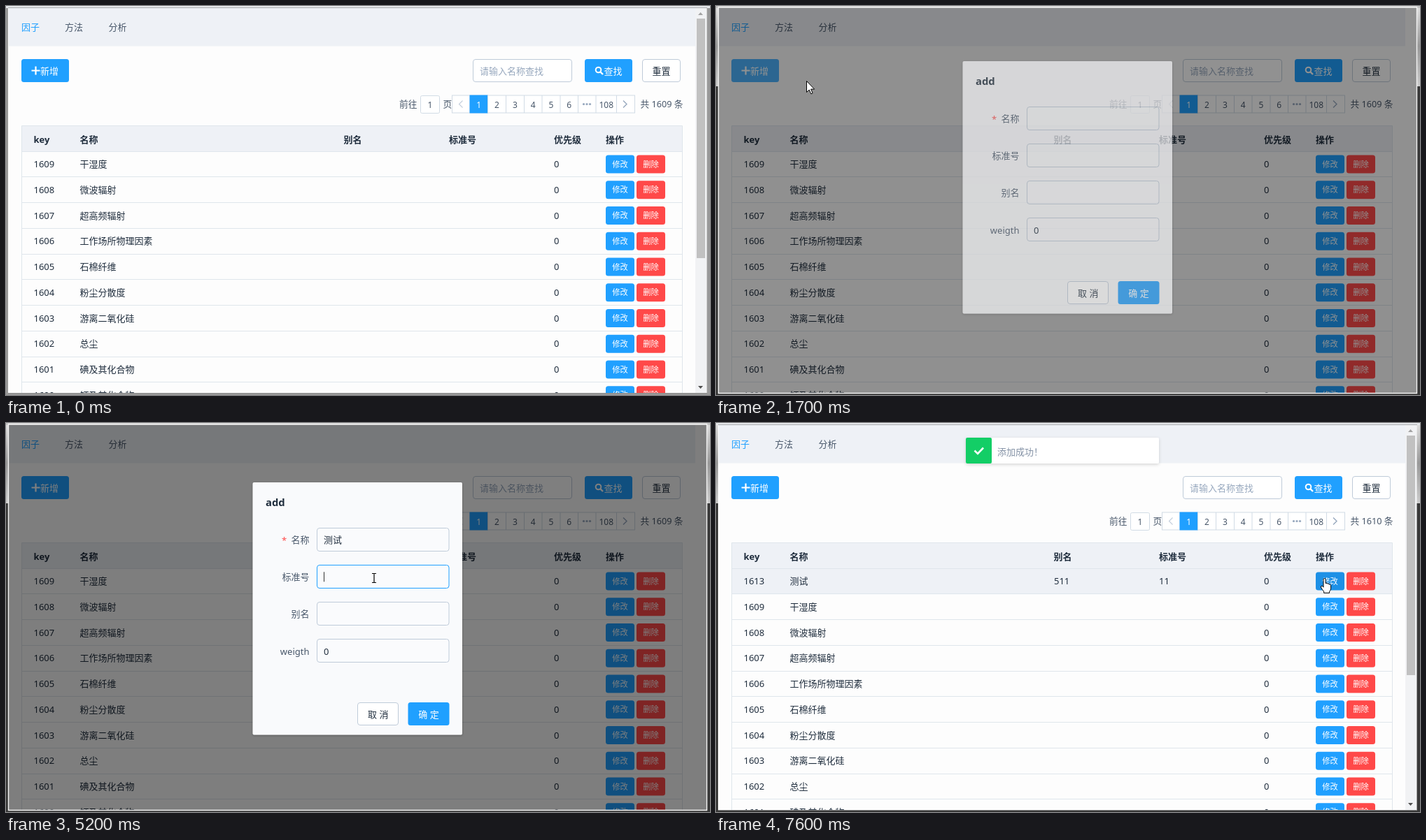
Animation of 1006x557 px, one loop 8000 ms. Source, as an HTML page:

```html
<!DOCTYPE html>
<html lang="zh-CN">
<head>
<meta charset="utf-8">
<style>
  html, body { margin: 0; width: 100%; height: 100%; overflow: hidden; background: #fdfdfd; }
  svg { display: block; font: 13px 'Noto Sans', 'Noto Sans CJK SC', 'Noto Sans CJK', sans-serif; }
</style>
</head>
<body>
<svg id="stage" width="1006" height="557" viewBox="0 0 1006 557"></svg>
<script>
const LOOP = 8000, STEP = 100;
const BLUE = '#20a0ff', HOVER = '#1d90e6', RED = '#ff4949', INK = '#1f2d3d', GREY = '#48576a',
      PALE = '#97a8be', EDGE = '#bfcbd9', LINE = '#dfe6ec', BAND = '#eef1f6', PAGE = '#fdfdfd';
const ROW_TOP = 208.5, ROW_H = 36.75;
const NAMES = ['干湿度', '微波辐射', '超高频辐射', '工作场所物理因素', '石棉纤维', '粉尘分散度',
               '游离二氧化硅', '总尘', '碘及其化合物', '钙及其化合物'];

// time, x, y, pointer shape
const POINTER = [
  [100, 871, 46, 'arrow'], [500, 480, 74, 'arrow'], [800, 160, 92, 'arrow'], [900, 98, 78, 'arrow'],
  [1000, 51, 44, 'arrow'], [1100, 51, 44, 'arrow'], [1200, 117, 90, 'arrow'], [1300, 46, 94, 'hand'],
  [1500, 46, 94, 'hand'], [1600, 66, 96, 'arrow'], [1700, 128.5, 106.5, 'arrow'], [2000, 404, 194, 'arrow'],
  [2300, 481, 167, 'beam'], [4700, 488, 172, 'beam'], [4900, 526, 222, 'beam'], [5300, 526, 222, 'beam'],
  [5400, 505, 275, 'beam'], [5500, 575, 345, 'arrow'], [5600, 616, 412, 'hand'], [5700, 619, 416, 'hand'],
  [6200, 619, 416, 'hand'], [6400, 624.5, 378, 'arrow'], [7200, 858, 226, 'arrow'],
  [7300, 863, 220, 'hand'], [7600, 869, 222, 'hand']];
const MASK = [[1500, 0], [1600, .2], [1700, .43], [1800, .5], [6300, .5], [6400, .036], [6500, 0]];
const DIALOG = [[1500, 0], [1600, .25], [1700, .67], [1800, .94], [1900, 1], [6300, 1], [6400, .2], [6500, .04], [6600, 0]];
const SLIDE = [[1500, -18.4], [1600, -13], [1700, -6], [1800, -1], [1900, 0], [6300, 0], [6400, -14], [6500, -18]];
const TOAST = [[6300, 0, -37], [6400, .68, -18], [6500, .95, -3], [6600, 1, 0]];

const SHAPES = {
  arrow: '<path d="M.5 .5v16l3.7-3.5 2.6 5.8 2.3-1-2.5-5.7h5z" fill="#fff" stroke="#000"/>',
  hand: '<path d="M.5 .5q1.6 0 1.6 1.6v5.4q2.6-.9 2.9 .8 2.2-.8 2.5 .9 2.1-.5 2.1 1.4v4q0 3-2 4.6v2.1h-8v-2.1q-2.4-2.4-4.2-6.2 0-2 1.8-1.7l1.8 1.9v-11.1q0-1.6 1.5-1.6z" fill="#fff" stroke="#000"/>',
  beam: '<path d="M-3-6.5h2.5l.5 .5 .5-.5h2.5M0-6v12M-3 6.5h2.5l.5-.5 .5 .5h2.5" fill="none" stroke="#000" stroke-width="1.2"/>'
};

// Value list at time t, linear between keys; words are kept from the earlier key
function at(keys, t) {
  let i = 0;
  while (i < keys.length - 1 && keys[i + 1][0] <= t) i++;
  const a = keys[i], b = keys[i + 1] || a;
  const k = b === a ? 0 : Math.max(0, (t - a[0]) / (b[0] - a[0]));
  return a.slice(1).map((v, j) => typeof v === 'number' ? v + (b[j + 1] - v) * k : v);
}

const rect = (x, y, w, h, fill, extra = '') =>
  `<rect x="${x}" y="${y}" width="${w}" height="${h}" fill="${fill}" ${extra}/>`;
const text = (x, y, s, fill = INK, extra = '') => `<text x="${x}" y="${y}" fill="${fill}" ${extra}>${s}</text>`;
const mid = 'text-anchor="middle"', end = 'text-anchor="end"';
const path = (d, stroke, w = 1, extra = '') => `<path d="${d}" fill="none" stroke="${stroke}" stroke-width="${w}" ${extra}/>`;
const box = (x, y, w, h, stroke = EDGE, fill = 'none') => rect(x, y, w, h, fill, `rx="3.5" stroke="${stroke}"`);
const pill = (x, y, w, h, fill) => rect(x, y, w, h, fill, 'rx="3.5"');
const group = (x, y, opacity, body) => `<g transform="translate(${x} ${y})" opacity="${opacity}">${body}</g>`;

function frame(t, modal) {
  if (t < 1500) return rect(0, 0, 1006, 557, '#999') + rect(0, 0, 1006, 3, '#e6e8eb');
  return rect(0, 0, 1006, 557, '#383838') + rect(0, 0, 1006, 115, 'url(#glass)') +
    rect(0, 0, 1006, 3, modal ? '#c4c4c4' : '#e6e8eb');
}

function toolbar(t) {
  const add = t < 1300 ? BLUE : t < 1600 ? HOVER : t < 2400 ? '#4db3ff' : BLUE;
  return rect(4, 3, 981, 54.5, BAND) +
    text(22, 35, '因子', BLUE) + text(84, 35, '方法', GREY) + text(146.5, 35, '分析', GREY) +
    pill(22, 76, 68, 33, add) + path('M36.5 92.5h12M42.5 86.5v12', '#fff', 2.2) + text(49, 97.5, '新增', '#fff') +
    box(667.5, 76.5, 141, 32, EDGE, '#fff') + text(677, 97.5, '请输入名称查找', PALE) +
    pill(827, 76, 68, 33, BLUE) + '<circle cx="846.5" cy="91.5" r="3.8" fill="none" stroke="#fff" stroke-width="2"/>' +
    path('M849.5 94.5l3.5 3.5', '#fff', 2.4) + text(854.5, 97.5, '查找', '#fff') +
    box(909.5, 76.5, 54, 32, EDGE, '#fff') + text(936.5, 97.5, '重置', INK, mid);
}

function pager(total) {
  const edges = [637.5, 663, 688.5, 714.5, 740.5, 766, 792, 817.5, 843, 872.5, 898.5];
  const labels = ['', '1', '2', '3', '4', '5', '6', '', '108', ''];
  const small = 'font-size="12.7"';
  let s = text(562, 145, '前往', GREY, small) + rect(592.5, 128.5, 27, 25, '#fff', `rx="2" stroke="#d1dbe5"`) +
    text(606, 145.5, '1', GREY, 'font-size="12" ' + mid) + text(624.5, 145, '页', GREY, small) +
    rect(637.5, 128, 261, 25, '#fff', 'stroke="#d1dbe5"');
  labels.forEach((label, i) => {
    const x = edges[i], c = (x + edges[i + 1]) / 2;
    if (i) s += path(`M${x} 128v25`, '#d1dbe5');
    if (i === 1) s += rect(x - .5, 127.5, 26, 26, BLUE);
    s += text(c, 145.5, label, i === 1 ? '#fff' : GREY, 'font-size="12" ' + mid);
  });
  s += path('M652.5 135.5l-5 5 5 5', '#c5d0dd', 1.2) + path('M882 135.5l5 5-5 5', PALE, 1.4);
  for (const x of [825.5, 830, 834.5]) s += `<circle cx="${x}" cy="140.5" r="1.6" fill="${PALE}"/>`;
  return s + text(967.5, 145, `共 ${total} 条`, GREY, small + ' ' + end);
}

function table(rows, hoverRow, hoverEdit) {
  let s = rect(22, 171.5, 945, 37, BAND);
  [[39.5, 'key'], [105.5, '名称'], [482.5, '别名'], [633, '标准号'], [783, '优先级'], [857, '操作']]
    .forEach(([x, label]) => s += text(x, 195.5, label, INK, 'font-weight="bold"'));
  rows.forEach(([key, name, alias, code], i) => {
    const y = ROW_TOP + i * ROW_H, base = y + 22.7;
    if (i === hoverRow) s += rect(22, y, 945, ROW_H, BAND);
    s += text(39.5, base, key) + text(105.5, base, name) + text(483, base, alias) + text(633, base, code) +
      text(783, base, '0') + path(`M22 ${Math.round(y) - .5}h945`, LINE) +
      pill(857, y + 5, 41, 26, hoverEdit && !i ? HOVER : BLUE) + pill(901, y + 5, 41, 26, RED) +
      text(877.5, y + 22, '修改', '#fff', 'font-size="11.3" ' + mid) +
      text(921.5, y + 22, '删除', '#fff', 'font-size="11.3" ' + mid);
  });
  return s + path('M22.5 557v-385.5h944v385.5', LINE);
}

const scrollbar = () => rect(985, 3, 16, 551, '#f1f2f4') + rect(987, 18, 12, 343, '#c1c1c1') +
  '<path d="M989 13l3.5-4 3.5 4z" fill="#a3a3a3"/><path d="M989 544l3.5 4 3.5-4z" fill="#505050"/>';

function dialog(t) {
  const open = t < 6400;
  const focus = t < 2400 ? -1 : t < 4800 ? 0 : t < 5400 ? 1 : t < 5900 ? 2 : -1;
  const values = [open && t >= 4200 ? '测试' : '', open && t >= 5300 ? '11' : '',
                  open && t >= 5400 ? '511'.slice(0, 1 + (t - 5400) / STEP) : '', '0'];
  const caretOn = t < 2700 || t >= 3000;
  let s = rect(352.5, 85, 299.5, 361.5, '#f9fafc', 'rx="2" filter="url(#shade)"') +
    text(371, 119, 'add', INK, 'font-size="14.8" font-weight="bold"') + text(394, 172.5, '*', RED);
  ['名称', '标准号', '别名', 'weigth'].forEach((label, i) => {
    const y = 150.5 + i * 53.3, wide = values[i].length * (i ? 7.45 : 13);
    const edge = i !== focus ? EDGE : t === 2400 ? '#7f9fc8' : BLUE;
    s += text(433.5, y + 21.3, label, GREY, end) + box(444.5, Math.round(y) - .5, 188.5, 33, edge, '#fafbfd') +
      text(454, y + 21.3, values[i]);
    if (i === focus && caretOn) s += path(`M${454.5 + Math.round(wide)} ${y + 9.5}v14`, '#333');
  });
  const over = t >= 5600 && t < 6400;
  return s + box(502.5, 400.5, 58, 32, EDGE, '#fff') + text(531.8, 421.5, '取 消', INK, mid) +
    pill(574.5, 400, 59, 33, over ? HOVER : BLUE) + text(604, 421.5, '确 定', '#fff', mid);
}

// Pinyin candidate window while the name is typed
function candidates(t) {
  if (t < 3500 || t >= 4200) return '';
  const typed = 'ceshi'.slice(0, t < 3800 ? 1 : 2 + (t - 3800) / STEP);
  const list = typed.length < 3 ? '1.从  2.才  3.次  4.成  5.出' : '1.测试  2.侧视  3.测时  4.策士  5.测';
  return rect(460.5, 180.5, t < 3800 ? 266 : 339, 46, '#fff', 'stroke="#b5c3d4"') +
    text(468, 198, typed) + path(`M461 203.5h${t < 3800 ? 265 : 338}`, LINE) + text(468, 219.5, list);
}

const toast = () => rect(0, 0, 276, 37, '#fff', 'rx="2" filter="url(#soft)"') + rect(0, 0, 37, 37, '#13ce66', 'rx="2"') +
  path('M12.5 18.5l4.5 4.5 8-8.5', '#fff', 2.6) + text(45, 25, '添加成功！', '#8391a5');

const DEFS = `<defs>
  <linearGradient id="glass" x2="0" y2="1"><stop stop-color="#e0e0e0"/><stop offset=".5" stop-color="#999"/><stop offset="1" stop-color="#ccc"/></linearGradient>
  <filter id="shade"><feDropShadow dx="0" dy="1" stdDeviation="1.5" flood-opacity=".3"/></filter>
  <filter id="soft" x="-10%" width="120%" y="-30%" height="170%"><feDropShadow dx="0" dy="1.5" stdDeviation="2" flood-opacity=".16"/></filter>
  <clipPath id="view"><path d="M3 3h998.500v551h-998.500z"/></clipPath></defs>`;

function render(t) {
  const [mask] = at(MASK, t), [shown] = at(DIALOG, t), [slide] = at(SLIDE, t), [fade, drop] = at(TOAST, t);
  const [px, py, shape] = at(POINTER, t);
  const saved = t >= 6400, modal = t >= 1600 && t < 6500, dim = t >= 1600 && t < 6400;
  const rows = NAMES.map((name, i) => [1609 - i, name, '', '']);
  if (saved) { rows.unshift([1613, '测试', '511', '11']); rows.pop(); }
  const hoverRow = t >= 6500 ? Math.floor((py - ROW_TOP) / ROW_H) : -1;

  let view = rect(3, 3, 999, 552, PAGE) + toolbar(t) + pager(saved ? 1610 : 1609) +
    table(rows, hoverRow, t >= 7300) + (modal ? '' : scrollbar());
  if (mask > 0) view += rect(3, 3, 999, 552, '#000', `opacity="${mask}"`);
  if (shown > 0) view += group(t >= 6500 ? -6 : 0, slide, shown, dialog(t));
  view += candidates(t);
  if (fade > 0) view += group(modal ? 364 : 357, 21 + drop, fade, toast());

  const rim = dim ? path('M3.5 1.500h998v553h-998z', '#f4f4f4', 1.4)
                  : path('M3 2.5h999', '#a9abae') + path('M3 554.5h999', '#8a8a8a');
  const pointer = t < 100 ? '' : group(Math.round(px), Math.round(py), 1, SHAPES[shape]);
  return DEFS + frame(t, dim) + `<g clip-path="url(#view)">${view}</g>` + rim + pointer;
}

const stage = document.getElementById('stage');
let last = -1;
function tick() {
  const t = Math.floor(performance.now() % LOOP / STEP) * STEP;
  if (t !== last) stage.innerHTML = render(last = t);
  requestAnimationFrame(tick);
}
tick();
</script>
</body>
</html>
```
